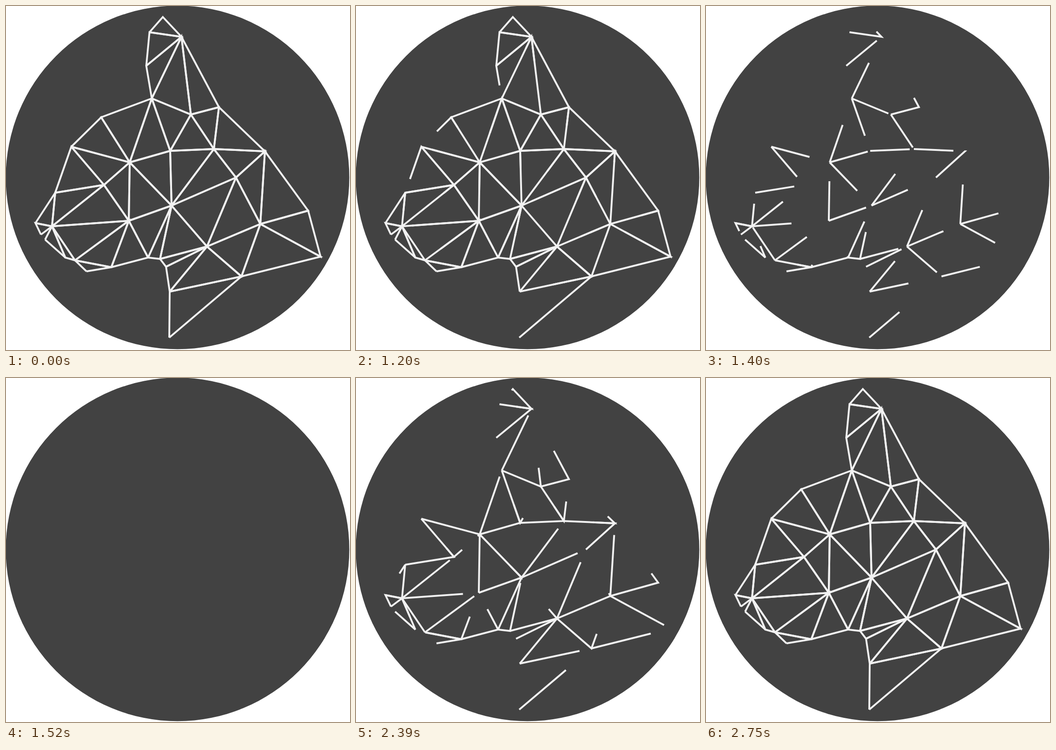
Animation of 748 by 748 pixels, one loop 3 s. Source, as an HTML page:

```html
<!DOCTYPE html>
<html lang="en">
<head>
<meta charset="utf-8">
<title>Line mesh</title>
<style>
  html, body { margin: 0; width: 100%; height: 100%; overflow: hidden; background: #fff; }
  svg { display: block; width: 100vw; height: 100vh; }
  circle { fill: #424242; }
  path {
    fill: none;
    stroke: #f2f2f2;
    stroke-width: 4;
    stroke-dasharray: 600 600;
    animation: trace 3s infinite step-end;
  }
  /* Dash offset = 600 minus the drawn length; each run advances in 13 steps of 40 ms. */
  @keyframes trace {
    0% { stroke-dashoffset: 104; }
    34.666% { stroke-dashoffset: 104; animation-timing-function: steps(13, start); }
    52% { stroke-dashoffset: 637; }
    75.666% { stroke-dashoffset: 628.5; animation-timing-function: steps(13, start); }
    93%, 100% { stroke-dashoffset: 104; }
  }
</style>
</head>
<body>
<svg viewBox="0 0 748 748">
  <circle cx="373" cy="372.8" r="373.5"/>
  <g id="mesh"></g>
</svg>
<script>
  const points = {
    A: [341, 24], B: [312, 57], C: [381.5, 67], D: [305, 130], E: [317, 201], F: [402, 236],
    G: [463, 220], H: [207, 242], I: [142, 306], J: [269, 340], K: [357, 315], L: [452, 311],
    M: [563, 316], N: [107, 406], O: [213, 389], P: [360, 434], Q: [500, 373], R: [64, 472],
    S: [100, 479], T: [267, 467], U: [553, 474], V: [657, 445], W: [684, 545], X: [437, 523],
    Y: [512, 588], Z: [356, 621], a: [348, 567], b: [355, 721], c: [335, 550], d: [309, 547],
    e: [229, 568], f: [175, 577], g: [150, 553], h: [129, 547], i: [85, 508], j: [76, 497]
  };

  // Each triangle is traced from its first corner, in the order given.
  const triangles = `BCA DCB ECD EFC EKF FGC FLG KLF PLK PQL QML LMG UVM UWV UMQ
    XUQ XQP XYU YWU ZYX ZXa aXc bYZ cXP dcP dPT edT TJO TPJ STO SON
    geT gTS gSh feg ihS jSR RSN NOI IJH IOJ JEH JKE JPK`.split(/\s+/);

  const outline = corners => `M${[...corners].map(c => points[c].join(" ")).join("L")}Z`;

  document.getElementById("mesh").innerHTML =
    triangles.map(t => `<path d="${outline(t)}"/>`).join("");
</script>
</body>
</html>
```
